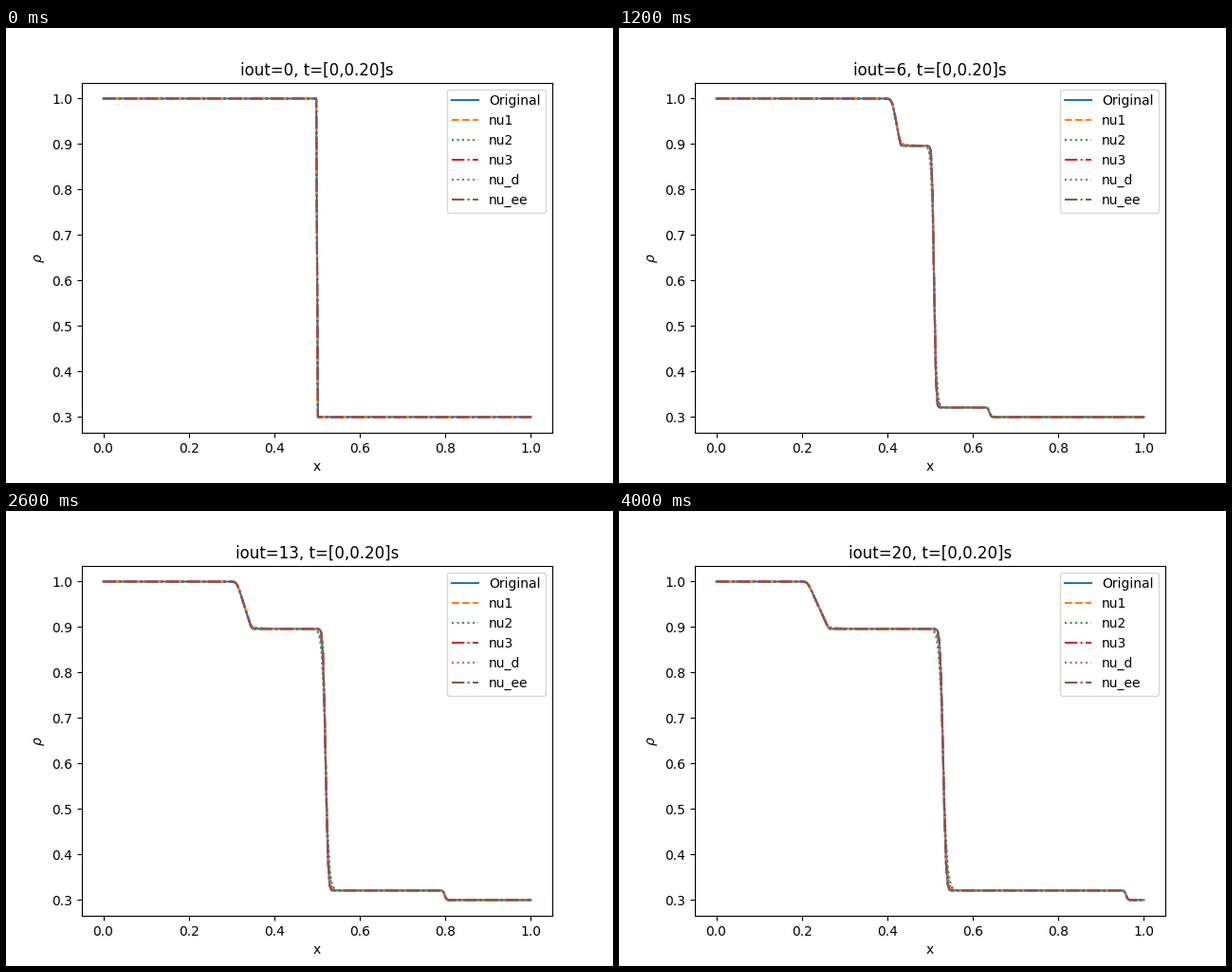
Write a matplotlib script that moves like this. It is 640 px wide and 480 px high and loops after 4.2 s.

```python
import math

import matplotlib.pyplot as plt
import numpy as np
from matplotlib.animation import FuncAnimation

FRAMES, INTERVAL, DT = 21, 200, 0.01
LEFT, RIGHT = 1.0, 0.3
PLATEAU_L, PLATEAU_R = 0.896, 0.321

# label, line style, contact sharpness (None: Gaussian), size of the tail bump
SCHEMES = [
    ("Original", "-", None, 0.0),
    ("nu1", "--", 1.4, 0.003),
    ("nu2", ":", 1.8, 0.003),
    ("nu3", "-.", None, 0.0),
    ("nu_d", ":", 1.5, 0.001),
    ("nu_ee", "-.", None, 0.0),
]

x = np.linspace(0, 1, 256)
erf = np.vectorize(math.erf)


def softplus(d, width):
    return width * np.logaddexp(0, d / width)


def rise(d, width):
    return 0.5 * (1 + np.tanh(d / width))


def density(t, spread, bump):
    """Shock tube: rarefaction fan, contact and shock leaving x = 0.5."""
    if t == 0:
        return np.where(x < 0.5, LEFT, RIGHT)
    head, tail = 0.496 - 1.415 * t, 0.503 - 1.2 * t
    contact, shock = 0.5 + 0.153 * t, 0.5017 + 2.284 * t
    tail_width = 0.002 if bump else 0.0008
    fan = (softplus(x - head, 0.0028) - softplus(x - tail, tail_width)) / (tail - head)
    rho = LEFT - (LEFT - PLATEAU_L) * fan

    sigma = 0.0091 * t ** (1 / 3)
    d = x - contact
    step = rise(d, spread * sigma) if spread else 0.5 * (1 + erf(d / sigma / math.sqrt(2)))
    rho -= (PLATEAU_L - PLATEAU_R) * step
    rho -= (PLATEAU_R - RIGHT) * rise(x - shock, 0.0035)

    past_tail = np.maximum(x - tail, 0)
    return rho + bump * np.exp(-past_tail / 0.03) * rise(x - tail, 0.002) * (1 - step)


fig, ax = plt.subplots(figsize=(6.4, 4.8), dpi=100)
lines = [ax.plot(x, density(0, None, 0), style, label=label)[0]
         for label, style, _, _ in SCHEMES]
ax.set_xlim(-0.05, 1.05)
ax.set_ylim(0.265, 1.035)
ax.set_xlabel("x")
ax.set_ylabel(r"$\rho$")
ax.legend(loc="upper right")
title = ax.set_title("")


def update(i):
    for line, (_, _, spread, bump) in zip(lines, SCHEMES):
        line.set_ydata(density(i * DT, spread, bump))
    title.set_text(f"iout={i}, t=[0,0.20]s")
    return [*lines, title]


anim = FuncAnimation(fig, update, frames=FRAMES, interval=INTERVAL, repeat=True)
plt.show()
```
